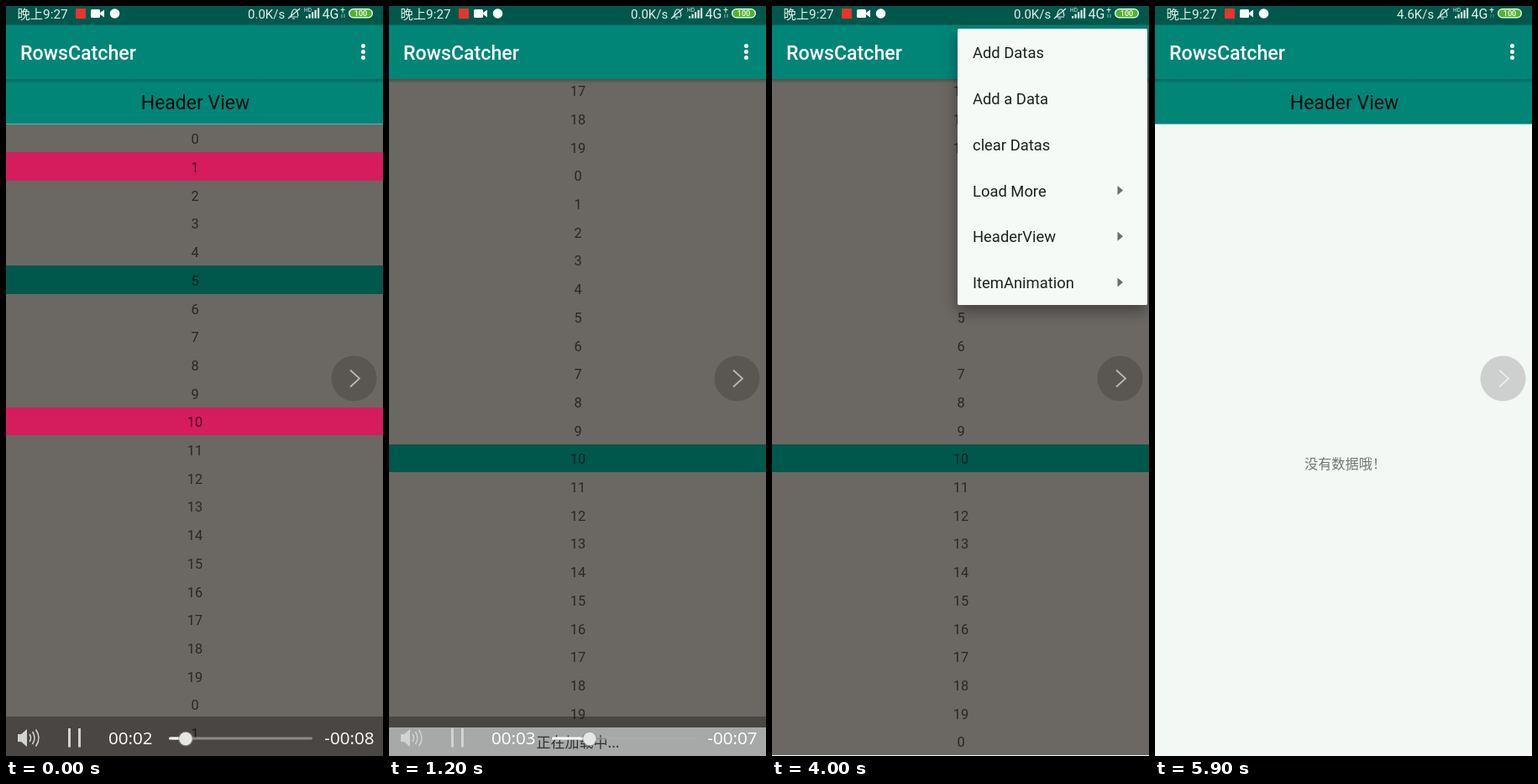
An HTML page with a canvas that plays this animation: 449x893 px, repeating every 7 s.

```html
<!DOCTYPE html>
<html lang="zh-CN">
<head>
<meta charset="utf-8">
<style>
html, body { margin: 0; width: 100%; height: 100%; overflow: hidden; background: #f4f8f5 }
canvas { display: block }
</style>
</head>
<body>
<canvas id="stage" width="449" height="893"></canvas>
<script>
const W = 449, H = 893, LOOP = 7000, TICK = 100;
const ROW = 33.7, LIST_TOP = 87, ROWS_TOP = 140.6, MAX_SCROLL = 630;
const GREEN = '#008577', DARK_GREEN = '#00574b', PINK = '#d51c5d', GREY = '#6b6763', PAPER = '#f5faf6';
const ROW_COLORS = { 1: PINK, 5: DARK_GREEN, 10: PINK, 30: DARK_GREEN };
// Moment at which each animated row starts to slide in.
const ROW_STARTS = { 28: 102, 31: 118, 32: 134, 33: 148, 35: 166, 36: 182, 37: 182, 38: 199, 39: 217, 40: 2000 };
const MENU = ['Add Datas', 'Add a Data', 'clear Datas', 'Load More', 'HeaderView', 'ItemAnimation'];
const SANS = 'Roboto, "Noto Sans CJK SC", "Noto Sans CJK", sans-serif';
const CJK = '"Noto Sans CJK SC", "Noto Sans CJK", sans-serif';
const ctx = document.getElementById('stage').getContext('2d');

const clamp = v => Math.max(0, Math.min(1, v));

function rect(x, y, w, h, color) {
  ctx.fillStyle = color;
  ctx.fillRect(x, y, w, h);
}

function disc(x, y, r, color) {
  ctx.fillStyle = color;
  ctx.beginPath();
  ctx.arc(x, y, r, 0, 7);
  ctx.fill();
}

function pill(x, y, w, h, r, color) {
  ctx.fillStyle = color;
  ctx.beginPath();
  ctx.roundRect(x, y, w, h, r);
  ctx.fill();
}

function shape(d, color) {
  ctx.fillStyle = color;
  ctx.fill(new Path2D(d));
}

function line(d, color, width) {
  ctx.strokeStyle = color;
  ctx.lineWidth = width;
  ctx.stroke(new Path2D(d));
}

// y is the vertical middle of the capitals.
function text(s, x, y, size, color, align = 'left', family = SANS, weight = 400) {
  ctx.font = `${weight} ${size}px ${family}`;
  ctx.textAlign = align;
  ctx.fillStyle = color;
  ctx.fillText(s, x, y + size * 0.36);
}

function layer(draw) {
  ctx.save();
  draw();
  ctx.restore();
}

function drawHeader(y) {
  rect(0, y, W, ROWS_TOP - LIST_TOP, GREEN);
  text('Header View', 225.5, y + 28, 23, '#0a0d0c', 'center');
}

function drawList(t) {
  const scroll = MAX_SCROLL * clamp((t - 42) / 198);
  const count = t < 2000 ? 40 : 41;
  drawHeader(LIST_TOP - scroll);
  for (let i = 0; i < count; i++) {
    const y = Math.round(ROWS_TOP + i * ROW - scroll);
    const next = Math.round(ROWS_TOP + (i + 1) * ROW - scroll);
    if (next < LIST_TOP || y > H) continue;
    const left = 1 - clamp((t - (ROW_STARTS[i] ?? -500)) / 500);
    const x = -W * left * left;
    rect(x, y, W, next - y, ROW_COLORS[i] || GREY);
    text(i % 20, x + 225, (y + next) / 2 + 1, 16.4, 'rgba(0,0,0,.62)', 'center');
  }
  if (count === 40) {
    const y = ROWS_TOP + 40 * ROW - scroll;
    text('正在加载中...', 225, y + 18, 17, '#454745', 'center', CJK);
  }
}

function drawEmpty() {
  drawHeader(LIST_TOP);
  text('没有数据哦！', 178, 545, 16.2, '#747774', 'left', CJK);
}

function drawAppBar() {
  const shade = ctx.createLinearGradient(0, LIST_TOP, 0, LIST_TOP + 5);
  shade.addColorStop(0, 'rgba(0,0,0,.25)');
  shade.addColorStop(1, 'rgba(0,0,0,0)');
  rect(0, LIST_TOP, W, 5, shade);
  rect(0, 22, W, 65, GREEN);
  text('RowsCatcher', 17, 56, 23.2, '#fff', 'left', SANS, 500);
  for (const y of [47.5, 54.5, 61.5]) disc(425.5, y, 2.5, '#fff');
}

function drawStatus(t) {
  const ink = '#e4eeeb';
  rect(0, 0, W, 22.5, DARK_GREEN);
  text('晚上9:27', 13.5, 9.5, 15.3, ink);
  rect(83, 3, 12, 12, '#e8342c');
  pill(101, 4, 11, 10, 1.5, '#fff');
  shape('M112 8L117 4.5V13.5L112 10Z', '#fff');
  disc(129.5, 9, 5.8, '#fff');

  text((t < 4800 ? '0.0' : '4.6') + 'K/s', 288, 9.5, 15, ink);
  line('M337 13H348M339 12C341 9 340 4 344 4S347 9 348 12M336 15L350 3M341 15H344', ink, 1.2);
  text('HD', 355, 4.5, 6.5, ink);
  for (let i = 0; i < 5; i++) rect(357 + i * 3.5, 12 - i * 2.4, 2.2, 2.6 + i * 2.4, ink);
  text('4G', 376.5, 9.5, 16, ink);
  const idle = (t >= 3000 && t < 4000) || t >= 5900;
  line('M401 2V8M398.5 4.5H403.5', ink, 1);
  line('M400 9.5V14M403 9.5V14', idle ? 'rgba(228,238,235,.35)' : 'rgba(228,238,235,.65)', 1);

  pill(408, 3, 29, 11.5, 5.7, '#fff');
  pill(409.3, 4.3, 26.4, 8.9, 4.4, '#4fb52b');
  text('100', 422.5, 8.9, 9, '#fff', 'center', SANS, 500);
}

function drawFloat() {
  disc(414.5, 443.5, 27, 'rgba(0,0,0,.16)');
  line('M410 433.5L421 443.5L410 453.5', 'rgba(255,255,255,.58)', 1.8);
}

function drawMenu(t) {
  if (t < 2400 || t >= 4600) return;
  const closing = t >= 4300;
  const shown = clamp((t - 2348) / 250);
  const rest = (1 - shown) ** 3;
  const x = 221 + 226 * rest, w = 447 - x, h = 329 * (1 - rest);

  layer(() => {
    ctx.globalAlpha = closing ? 0.8 - (t - 4300) / 375 : clamp(shown * 4);
    // Cast the shadow outside the panel only, so fading stays even.
    layer(() => {
      ctx.beginPath();
      ctx.rect(0, 0, W, H);
      ctx.roundRect(x, 27, w, h, 2);
      ctx.clip('evenodd');
      ctx.shadowColor = 'rgba(0,0,0,.4)';
      ctx.shadowBlur = 18;
      ctx.shadowOffsetY = 7;
      pill(x, 27, w, h, 2, PAPER);
    });
    pill(x, 27, w, h, 2, PAPER);
    ctx.beginPath();
    ctx.rect(x, 27, w, h);
    ctx.clip();
    if (closing) layer(() => {
      ctx.beginPath();
      ctx.rect(221, 137.5, 226, 54);
      ctx.clip();
      disc(333.5, 164.5, 110, 'rgba(0,0,0,.16)');
    });
    ctx.translate(113 * rest, -175 * rest);
    MENU.forEach((label, i) => {
      const y = 55.5 + i * 54.8;
      text(label, 239, y, 18.4, '#1d201e');
      if (i > 2) shape(`M411.5 ${y - 6}L418 ${y - 0.5}L411.5 ${y + 5}Z`, '#6b6e6c');
    });
  });
  if (closing) layer(() => {
    ctx.globalAlpha = 0.6;
    for (const y of [47.5, 54.5, 61.5]) disc(425.5, y, 2.5, '#fff');
  });
}

function drawPlayer(t) {
  if (t >= 1500) return;
  const knob = 214 + t * 0.0208, ink = '#d2d2d0';
  layer(() => {
    ctx.globalAlpha = clamp((1500 - t) / 300);
    rect(0, 846, W, 47, 'rgba(0,0,0,.32)');
    shape('M14 867H18L25 861V882L18 876H14Z', ink);
    line('M28 867Q31 871.5 28 876M31.5 864Q36.5 871.5 31.5 879M35.5 861.5Q42.5 871.5 35.5 881.5', ink, 1.6);
    rect(74, 860, 3, 22.5, ink);
    rect(86, 860, 3, 22.5, ink);
    const family = '"Open Sans", "Noto Sans", sans-serif';
    text(t < 900 ? '00:02' : '00:03', 122, 871.5, 20.6, '#fff', 'left', family);
    text(t < 400 ? '-00:08' : '-00:07', 438.5, 871.5, 20.6, '#fff', 'right', family);
    pill(194, 870.5, 171, 3, 1.5, 'rgba(175,175,173,.65)');
    pill(194, 870.5, knob - 194, 3, 1.5, '#fff');
    disc(knob, 872.5, 9, 'rgba(150,150,150,.6)');
    disc(knob, 872.5, 7.7, '#e6e6e5');
  });
}

function draw(t) {
  rect(0, 0, W, H, '#f4f8f5');
  if (t < 4300) drawList(t);
  else drawEmpty();
  drawAppBar();
  drawStatus(t);
  drawMenu(t);
  drawFloat();
  drawPlayer(t);
}

const start = performance.now();
function frame() {
  const t = (performance.now() - start) % LOOP;
  draw(Math.floor(t / TICK) * TICK);
  requestAnimationFrame(frame);
}
frame();
</script>
</body>
</html>
```
